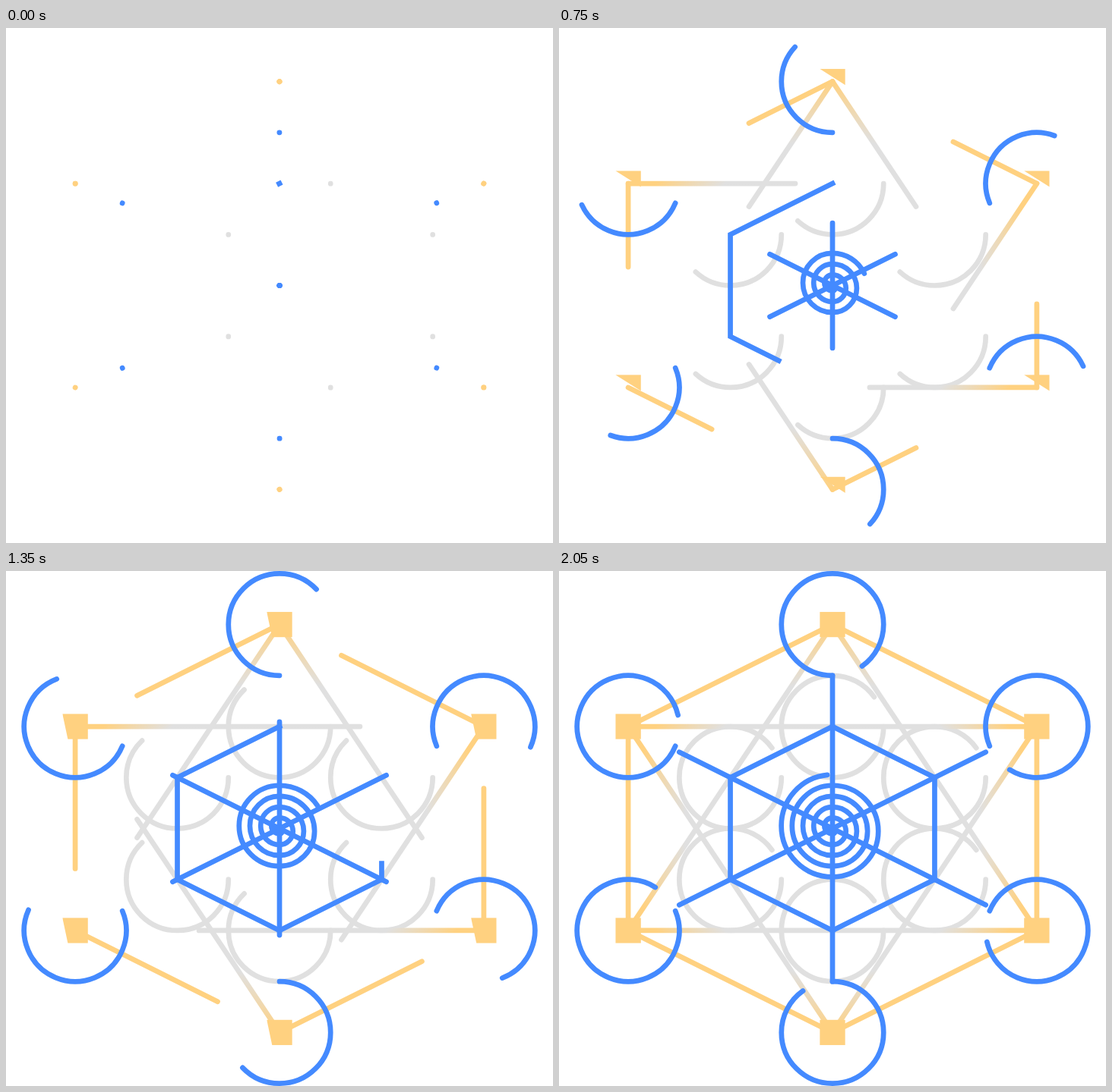
Animation of 720x679 px, one loop 3550 ms. Source, as an HTML page without scripts:

```html
<!DOCTYPE html>
<html lang="en">
<head>
<meta charset="utf-8">
<title>Hexagon line drawing</title>
<style>
  @property --p { syntax: "<number>"; inherits: true; initial-value: 0; }

  html, body { margin: 0; width: 100%; height: 100%; overflow: hidden; background: #fff; }

  svg {
    display: block;
    width: 720px;
    height: 679px;
    fill: none;
    stroke-width: .1;
    stroke-linecap: round;
    animation: draw 3550ms infinite;
  }

  /* --p is the drawn share of every line, advancing in 50 ms ticks */
  @keyframes draw {
    0%     { --p: .0005; animation-timing-function: steps(6); }
    8.45%  { --p: .2045; animation-timing-function: steps(5); }
    15.49% { --p: .304;  animation-timing-function: steps(4); }
    21.12% { --p: .409;  animation-timing-function: steps(7); }
    30.98% { --p: .595;  animation-timing-function: steps(5); }
    38.02% { --p: .697;  animation-timing-function: steps(6); }
    46.47% { --p: .78;   animation-timing-function: steps(2); }
    49.29% { --p: .885;  animation-timing-function: steps(6); }
    57.74%, 100% { --p: 1; }
  }

  [pathLength] { stroke-dasharray: var(--p) 2; }

  .grey { stroke: #e0e0e0; }
  .fade { stroke: url(#fade); }
  .gold { stroke: #ffd180; }
  .blue { stroke: #448aff; }
  .hex { stroke-linecap: square; }
  .spiral { stroke-width: calc(.1 / .05275); }

  /* The fill grows as its outline is traced: top, right, bottom, left */
  .box {
    --b: calc(100% * clamp(0, 4 * var(--p) - 1, 1));
    --x: calc(100% * clamp(0, 3 - 4 * var(--p), 1));
    fill: #ffd180;
    clip-path: polygon(0 0, 100% 0, 100% var(--b), var(--x) var(--b)) fill-box;
  }
</style>
</head>
<body>
<svg viewBox="-5.355 -5.05 10.71 10.1">
  <defs>
    <radialGradient id="fade" gradientUnits="userSpaceOnUse" cx="0" cy="0" r="4">
      <stop offset=".725" stop-color="#e0e0e0"/>
      <stop offset="1" stop-color="#ffd180"/>
    </radialGradient>
    <circle id="ring" r="1" pathLength="1"/>
    <rect id="box" class="box" x="-.25" y="-.25" width=".5" height=".5"/>
  </defs>

  <g class="grey">
    <use href="#ring" y="-2"/>
    <use href="#ring" x="2" y="-1"/>
    <use href="#ring" x="2" y="1"/>
    <use href="#ring" y="2"/>
    <use href="#ring" x="-2" y="1"/>
    <use href="#ring" x="-2" y="-1"/>
  </g>

  <g class="gold">
    <path pathLength="1" d="M0-4L-4-2"/>
    <path pathLength="1" d="M-4-2V2"/>
    <path pathLength="1" d="M-4 2L0 4"/>
    <path pathLength="1" d="M0 4L4 2"/>
    <path pathLength="1" d="M4 2V-2"/>
    <path pathLength="1" d="M4-2L0-4"/>
  </g>

  <g class="fade">
    <path pathLength="1" d="M0-4L4 2"/>
    <path pathLength="1" d="M0-4L-4 2"/>
    <path pathLength="1" d="M-4-2H4"/>
    <path pathLength="1" d="M4-2L0 4"/>
    <path pathLength="1" d="M4 2H-4"/>
    <path pathLength="1" d="M0 4L-4-2"/>
  </g>

  <g class="blue">
    <use href="#ring" transform="translate(0 -4) rotate(90)"/>
    <use href="#ring" transform="translate(4 -2) rotate(157.5)"/>
    <use href="#ring" transform="translate(4 2) rotate(202.5)"/>
    <use href="#ring" transform="translate(0 4) rotate(270)"/>
    <use href="#ring" transform="translate(-4 2) rotate(-22.5)"/>
    <use href="#ring" transform="translate(-4 -2) rotate(22.5)"/>

    <path pathLength="1" d="M0 0V-3"/>
    <path pathLength="1" d="M0 0L3-1.5"/>
    <path pathLength="1" d="M0 0L3 1.5"/>
    <path pathLength="1" d="M0 0V3"/>
    <path pathLength="1" d="M0 0L-3 1.5"/>
    <path pathLength="1" d="M0 0L-3-1.5"/>

    <path class="hex" pathLength="1" d="M0-2L-2-1V1L0 2L2 1V-1Z"/>

    <!-- Five turns built from half circles of growing radius -->
    <path class="spiral" pathLength="1" transform="scale(.05275)" d="M0 0
      a1 1 0 0 1 0 2 a3 3 0 0 1 0 -6
      a5 5 0 0 1 0 10 a7 7 0 0 1 0 -14
      a9 9 0 0 1 0 18 a11 11 0 0 1 0 -22
      a13 13 0 0 1 0 26 a15 15 0 0 1 0 -30
      a17 17 0 0 1 0 34 a19 19 0 0 1 0 -38"/>
  </g>

  <use href="#box" y="-4"/>
  <use href="#box" x="4" y="-2"/>
  <use href="#box" x="4" y="2"/>
  <use href="#box" y="4"/>
  <use href="#box" x="-4" y="2"/>
  <use href="#box" x="-4" y="-2"/>
</svg>
</body>
</html>
```
